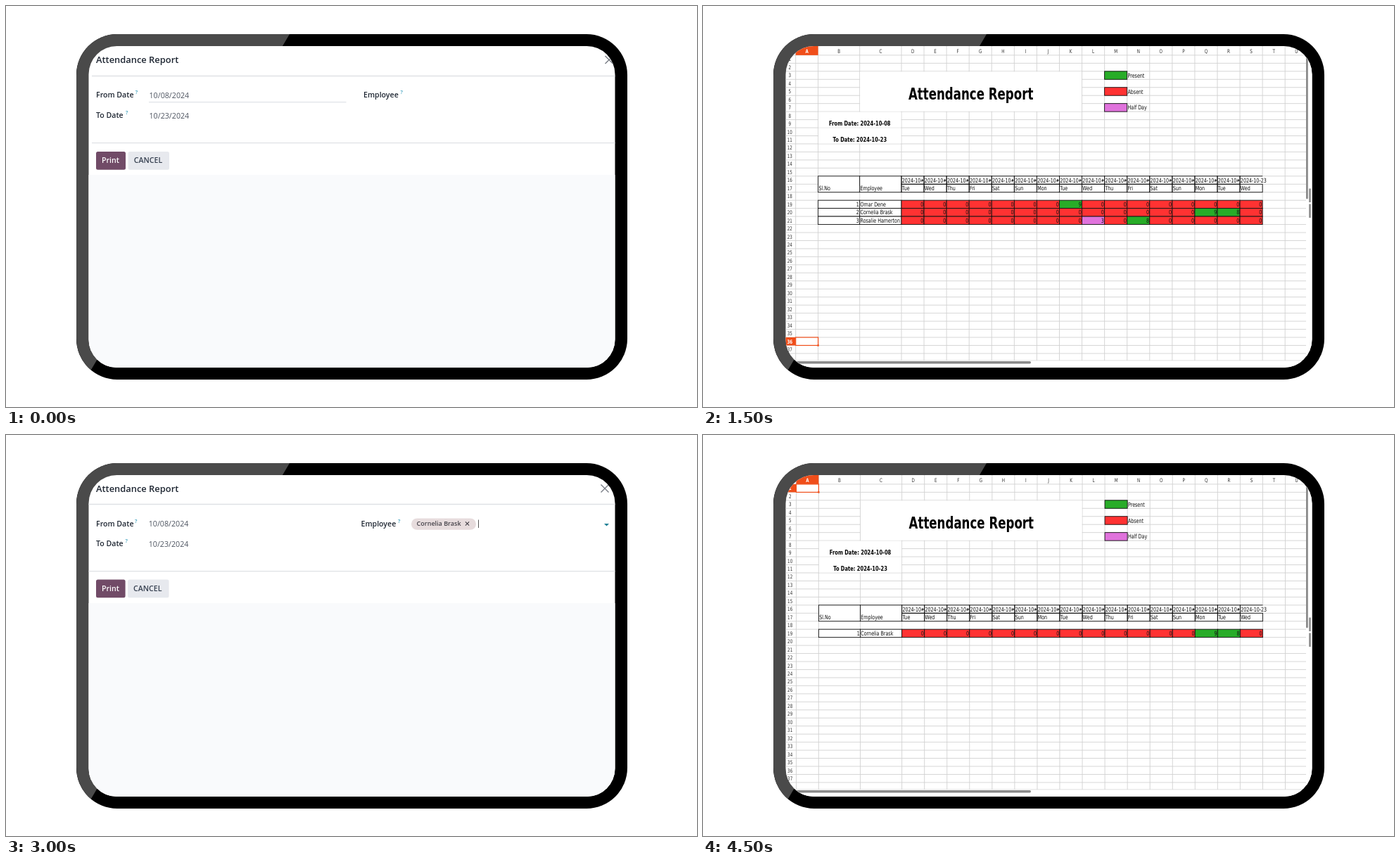
An HTML page that plays this animation: 982x570 px, repeating every 6000 ms.

```html
<!DOCTYPE html>
<html lang="en">
<head>
<meta charset="utf-8">
<title>Attendance report</title>
<style>
  html, body { margin: 0; width: 100%; height: 100%; overflow: hidden; background: #fff; }
  svg { display: block; width: 100vw; height: 100vh; }
  .form { font-family: "Open Sans", "Noto Sans", sans-serif; }
  .sheet { font-family: "DejaVu Sans", sans-serif; }
  text { white-space: pre; }
</style>
</head>
<body>
<svg id="stage" viewBox="0 0 982 570" xmlns="http://www.w3.org/2000/svg">
  <defs>
    <clipPath id="body"><rect x="100" y="40" width="783" height="491" rx="58"/></clipPath>
    <clipPath id="screen"><rect x="117.5" y="57" width="748" height="457" rx="40"/></clipPath>
  </defs>
  <rect width="982" height="570" fill="#fff"/>
  <g clip-path="url(#body)">
    <rect x="100" y="40" width="783" height="491" fill="#000"/>
    <path d="M100 40H403L121 517L112 531H100Z" fill="#4a4a4a"/>
  </g>
  <g id="view" clip-path="url(#screen)"></g>
</svg>
<script>
const NS = "http://www.w3.org/2000/svg";
const HOLD = 1500;
const SQUEEZE = 0.74; // the sheet is shown narrower than its natural shape
const INK = "#1f2733", BLACK = "#111";
const GREEN = "#28ac28", RED = "#ff3232", VIOLET = "#e073dc", ORANGE = "#f04e1a";
const view = document.getElementById("view");

function add(parent, tag, attrs, content) {
  const el = document.createElementNS(NS, tag);
  for (const key in attrs) el.setAttribute(key, attrs[key]);
  if (content !== undefined) el.textContent = content;
  parent.appendChild(el);
  return el;
}

function box(parent, x, y, x2, y2, fill, more) {
  return add(parent, "rect", { x, y, width: x2 - x, height: y2 - y, fill, ...more });
}

function line(parent, d, stroke, width = 1) {
  return add(parent, "path", { d, stroke, "stroke-width": width, fill: "none" });
}

function cross(parent, x, y, r, stroke, width) {
  line(parent, `M${x - r} ${y - r}L${x + r} ${y + r}M${x + r} ${y - r}L${x - r} ${y + r}`, stroke, width);
}

function page(kind) {
  const g = add(view, "g", { class: kind, visibility: "hidden" });
  box(g, 117, 57, 866, 514, "#fff");
  return g;
}

// ---------- dialog ----------

function makeForm({ dy, dx, left, employee, closeX, tag }) {
  const g = page("form");
  const label = (x, y, str, size = 10.6, fill = INK, weight = 600) =>
    add(g, "text", { x, y, "font-size": size, "font-weight": weight, fill }, str);
  const hint = (x, y) => label(x, y, "?", 7.5, "#3a9fbd");

  box(g, 117, 240 + dy, 866, 514, "#f9fafc");
  for (const y of [99.5, 194.6]) line(g, `M${left} ${y + dy}H866`, "#dfe1e5", 1.4);

  label(128, 81 + dy / 2, "Attendance Report", 12.9);
  cross(g, closeX, 76.5 + dy / 2, 5.5, "#777c84", 1.4);

  label(128, 130 + dy / 2, "From Date");
  hint(183.8 + dx, 125 + dy / 2);
  label(203.5 + dx, 130.6 + dy / 2, "10/08/2024", 10.7, "#4d5460", 400);
  label(128, 158.7 + dy, "To Date");
  hint(170 + dx / 2, 154 + dy);
  label(203.5 + dx, 159.6 + dy, "10/23/2024", 10.7, "#4d5460", 400);

  label(employee, 130 + dy / 2, "Employee");
  hint(employee + 52.5, 125 + dy / 2);

  const top = 207 + dy * 1.4, bottom = 232.7 + dy * 1.5;
  box(g, 128, top, 170 + dx / 2, bottom, "#714b67", { rx: 2.5 });
  label(136, 223.2 + dy * 1.4, "Print", 10.6, "#fff");
  box(g, 173.5 + dx / 2, top, 232 + dx / 2, bottom, "#e7e9ee", { rx: 2.5 });
  label(181.8 + dx, 223.2 + dy * 1.4, "CANCEL", 10.6, "#374151");

  if (tag) {
    box(g, 576, 118.5, 668, 134.8, "#e7dcdd", { rx: 8.1 });
    label(583.6, 129.4, tag, 9, "#46434a");
    cross(g, 655.5, 126, 2.6, "#46434a", 1.2);
    line(g, "M671.5 120.5V132", "#555", 1);
    add(g, "path", { d: "M850 126H857L853.5 129.6Z", fill: "#1b7f94" });
  } else {
    line(g, "M203 136.6H483.5", "#e0e3e8", 1.2);
  }
  return g;
}

// ---------- spreadsheet ----------

const DAYS = ["Sun", "Mon", "Tue", "Wed", "Thu", "Fri", "Sat"];
const ROW = 11.46;
const rowTop = n => 69.9 + (n - 1) * ROW;

// Each person: name and the days with hours worked, counted from column D
function makeSheet({ shift, step, people, activeRow }) {
  const g = page("sheet");
  const edges = [131.7 + shift, 163.6 + shift, 222.7 + shift];
  for (let i = 0; i <= 18; i++) edges.push(282 + shift * 0.8 + i * step);
  const right = 857;

  const write = (x, y, str, { size = 8.6, anchor = "start", weight = 400, fill = BLACK } = {}) =>
    add(g, "text", {
      transform: `translate(${x} ${y}) scale(${SQUEEZE} 1)`,
      "font-size": size, "font-weight": weight, "text-anchor": anchor, fill
    }, str);
  const cellLeft = (col, row, str) => write(edges[col] + 0.8, rowTop(row) + 8.8, str);
  const cellRight = (col, row, str) =>
    write(edges[col + 1] - 0.8, rowTop(row) + 8.8, str, { anchor: "end" });
  const frame = (col, row, fill = "none", rows = 1) =>
    box(g, edges[col], rowTop(row), edges[col + 1], rowTop(row + rows), fill,
      { stroke: BLACK, "stroke-width": 0.9 });
  const blank = (c1, r1, c2, r2) =>
    box(g, edges[c1] + 0.5, rowTop(r1) + 0.5, edges[c2 + 1] - 0.5, rowTop(r2 + 1) - 0.5, "#fff");

  // Grid and merged areas
  let grid = "";
  for (let n = 1; n <= 38; n++) grid += `M117 ${rowTop(n)}H${right}`;
  for (const x of edges) if (x < right) grid += `M${x} 57V504`;
  line(g, grid + `M117 504H${right}`, "#d2d2d2", 0.9);
  blank(2, 3, 10, 7);
  blank(1, 8, 2, 9);
  blank(1, 10, 2, 11);

  // Headings
  box(g, edges[0], 57, edges[1], rowTop(1), ORANGE);
  box(g, 117, rowTop(activeRow), edges[0], rowTop(activeRow + 1), ORANGE);
  const active = on => ({ anchor: "middle", size: 7.6, weight: on ? 700 : 400, fill: on ? "#fff" : "#333" });
  for (let i = 0; i <= 20; i++) {
    const end = edges[i + 1] || edges[i] + step;
    write((edges[i] + end) / 2, 66.9, String.fromCharCode(65 + i), active(i === 0));
  }
  for (let n = 1; n <= 37; n++) write(123.3 + shift * 0.5, rowTop(n) + 8.5, n, active(n === activeRow));

  // Selected cell
  box(g, edges[0], rowTop(activeRow), edges[1], rowTop(activeRow + 1), "#fff",
    { stroke: ORANGE, "stroke-width": 1.2 });
  box(g, edges[1] - 1.2, rowTop(activeRow + 1) - 1.2, edges[1] + 1.2, rowTop(activeRow + 1) + 1.2, ORANGE);

  // Titles
  const heading = (x, y, str, size) => write(x, y, str, { size, anchor: "middle", weight: 700, fill: "#000" });
  heading((edges[2] + edges[11]) / 2, 133, "Attendance Report", 22.5);
  heading((edges[1] + edges[3]) / 2, rowTop(9) + 8.9, "From Date: 2024-10-08", 9.1);
  heading((edges[1] + edges[3]) / 2, rowTop(11) + 8.9, "To Date: 2024-10-23", 9.1);

  // Key
  [["Present", GREEN], ["Absent", RED], ["Half Day", VIOLET]].forEach(([name, fill], i) => {
    frame(12, 3 + 2 * i, fill);
    cellLeft(13, 3 + 2 * i, name);
  });

  // Table head
  ["Sl.No", "Employee"].forEach((name, i) => {
    frame(1 + i, 16, "#fff", 2);
    cellLeft(1 + i, 17, name);
  });
  for (let d = 0; d < 16; d++) {
    const col = 3 + d, last = d === 15;
    const x = edges[col], x2 = edges[col + 1], y = rowTop(16);
    if (last) {
      box(g, x2 - 2, y + 1, x2 + 8, y + ROW - 1, "#fff");
      line(g, `M${x2} ${y}H${x}V${y + ROW}`, BLACK, 0.9);
    } else {
      frame(col, 16);
      add(g, "path", { d: `M${x2 - 3.4} ${y + 3.6}L${x2 - 0.6} ${y + 6}L${x2 - 3.4} ${y + 8.4}Z`, fill: "#333" });
    }
    cellLeft(col, 16, last ? "2024-10-23" : "2024-10-");
    frame(col, 17);
    cellLeft(col, 17, DAYS[(d + 2) % 7]);
  }

  // Table body
  people.forEach(([name, hours], i) => {
    const row = 19 + i;
    frame(1, row, "#fff");
    cellRight(1, row, i + 1);
    frame(2, row, "#fff");
    cellLeft(2, row, name);
    for (let d = 0; d < 16; d++) {
      const h = hours[d] || 0;
      frame(3 + d, row, h === 0 ? RED : h < 8 ? VIOLET : GREEN);
      cellRight(3 + d, row, h);
    }
  });

  // Scroll bars
  box(g, 857.3, 57, 866, 514, "#fff");
  box(g, 117, 504.5, 866, 514, "#fff");
  box(g, 126, 505, 466, 508.4, "#8b8b8b", { rx: 1.6 });
  box(g, 857, 72, 859.8, 274.5, "#8b8b8b", { rx: 1.4 });
  box(g, 861.2, 259.5, 863.8, 279, "#8b8b8b");
  box(g, 861.2, 281.5, 863.8, 301, "#8b8b8b");
  return g;
}

const ADMIN = ["Cornelia Brask", { 13: 9, 14: 8 }];
const pages = [
  makeForm({ dy: 0, dx: 0, left: 122, employee: 508, closeX: 857 }),
  makeSheet({
    shift: 0, step: 32.07, activeRow: 36,
    people: [["Omar Dene", { 7: 9 }], ADMIN, ["Rosalie Hamerton", { 8: 3, 10: 8 }]]
  }),
  makeForm({ dy: -1, dx: -0.8, left: 117, employee: 504.5, closeX: 851, tag: ADMIN[0] }),
  makeSheet({ shift: 0.8, step: 32.05, activeRow: 1, people: [ADMIN] })
];

function draw(ms) {
  const now = Math.floor(ms / HOLD) % pages.length;
  pages.forEach((p, i) => p.setAttribute("visibility", i === now ? "visible" : "hidden"));
}

const start = performance.now();
function tick() {
  draw(performance.now() - start);
  requestAnimationFrame(tick);
}
draw(0);
requestAnimationFrame(tick);
</script>
</body>
</html>
```
